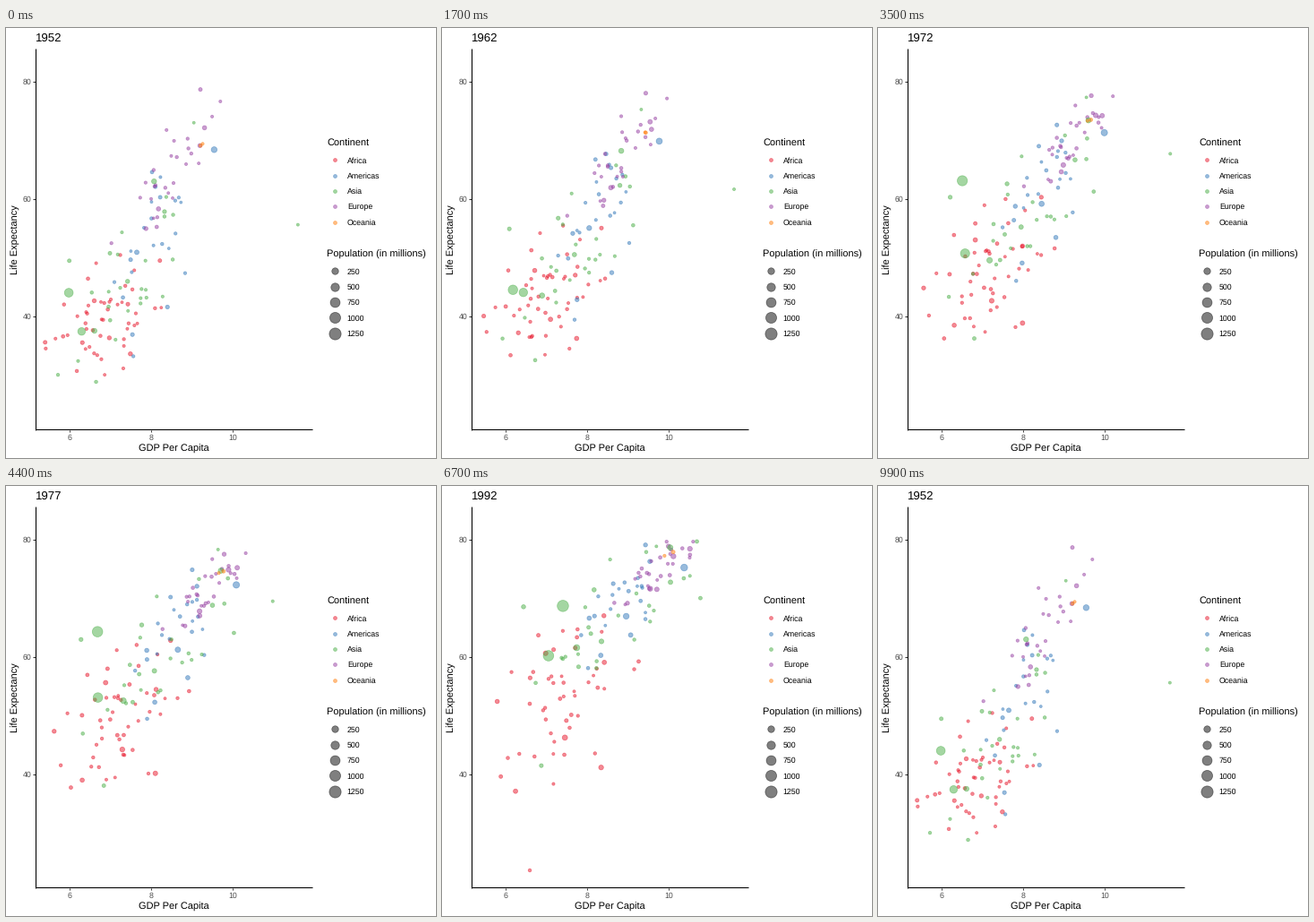
A matplotlib script for the animation above (10000 ms loop, 480 px wide and 480 px high).

```python
import numpy as np
import matplotlib.pyplot as plt
from matplotlib.animation import FuncAnimation

plt.rcParams["font.family"] = "Liberation Sans"
plt.rcParams["text.hinting"] = "none"

YEARS = np.arange(1952, 2008, 5)
KEYS = [1952, 1982, 2007]
ARRIVE = np.array([8, 17, 26, 35, 44, 51, 59, 67, 75, 83, 91, 99])
LEAVE = ARRIVE - 4
LEAVE[5] += 1  # one shorter move

COLORS = {"Africa": "#e8162b", "Americas": "#3278ba", "Asia": "#4aae47",
          "Europe": "#963fa2", "Oceania": "#ff7d08"}

# Count, then at the key years: mean and spread of log gdp and of life
CLOUDS = {
    "Africa": (50, [6.87, 7.33, 7.5], [0.66, 0.8, 0.9],
               [39.3, 51.8, 55], [4.8, 7, 9.2], 0.35),
    "Americas": (23, [8.05, 8.72, 9], [0.48, 0.5, 0.52],
                 [52.5, 66.3, 73.4], [8.8, 6, 3.8], 0.55),
    "Asia": (27, [7.5, 8.45, 8.95], [0.8, 1, 1.15],
             [47, 63.7, 71.5], [8.2, 7, 6], 0.6),
    "Europe": (30, [8.5, 9.6, 9.98], [0.58, 0.45, 0.56],
               [64.6, 73, 77.8], [6, 2.6, 2.8], 0.8),
}

# Continent, population in millions, stops of (year, gdp, life)
MOVERS = [
    ("Asia", (556, 1319), [(1952, 400, 44), (1962, 488, 44.5),
                           (1972, 677, 63.1), (1982, 962, 65.5),
                           (1992, 1656, 68.7), (2007, 4959, 73)]),
    ("Asia", (372, 1110), [(1952, 547, 37.4), (1972, 724, 50.7),
                           (1992, 1164, 60.2), (2007, 2452, 64.7)]),
    ("Asia", (82, 224), [(1952, 750, 37.5), (2007, 3541, 70.6)]),
    ("Asia", (86, 127), [(1952, 3217, 63), (1972, 14779, 73.4),
                         (2007, 31656, 82.6)]),
    ("Asia", (1, 3), [(1952, 108382, 55.6), (1972, 109348, 67.7),
                      (1982, 31354, 71.3), (2007, 47307, 77.6)]),
    ("Asia", (8, 32), [(1952, 779, 28.8), (1982, 978, 39.9),
                       (2007, 975, 43.8)]),
    ("Americas", (157, 301), [(1952, 13990, 68.4), (1972, 21806, 71.3),
                              (2007, 42952, 78.2)]),
    ("Americas", (57, 190), [(1952, 2109, 50.9), (1982, 7031, 63.3),
                             (2007, 9066, 72.4)]),
    ("Africa", (33, 135), [(1952, 1077, 36.3), (1982, 1577, 45.8),
                           (2007, 2014, 46.9)]),
    ("Africa", (3, 9), [(1952, 493, 40), (1987, 848, 44), (1992, 737, 23.6),
                        (1997, 590, 36.1), (2007, 863, 46.2)]),
    ("Oceania", (9, 20), [(1952, 10040, 69.1), (2007, 34435, 81.2)]),
    ("Oceania", (2, 4), [(1952, 10557, 69.4), (2007, 25185, 80.2)]),
]


def to_x(log_gdp):
    return 70.5 + 45.65 * (log_gdp - 6)


def to_y(life):
    return 321.7 - 6.545 * (life - 40)


def mark_radius(size):
    return 0.375 * (size * 2.845 + 0.945)


def pop_radius(pop):
    return mark_radius(1 + 5 * np.sqrt(np.clip(pop / 1318.7, 0, 1)))


def area(radius):
    return (2 * np.asarray(radius)) ** 2


def over_years(pair):
    first, last = pair
    return first + (last - first) * np.linspace(0, 1, len(YEARS))


def pack(log_gdp, life, pop):
    return np.stack([to_x(log_gdp), to_y(life), pop_radius(pop)], axis=-1)


def cloud_tracks(rng, count, x_mean, x_sd, y_mean, y_sd, link):
    """A drifting cloud, shape (years, dots, 3), in which ranks shift slowly."""
    z = rng.normal(size=(4, count)).clip(-2.1, 2.1)
    z = (z - z.mean(1, keepdims=True)) / z.std(1, keepdims=True)
    turn = np.linspace(0, 0.75, len(YEARS))[:, None]
    u = np.cos(turn) * z[0] + np.sin(turn) * z[1]
    v = np.cos(turn) * z[2] + np.sin(turn) * z[3]
    v = link * u + np.sqrt(1 - link ** 2) * v

    def spread(mean, sd, latent):
        mean, sd = (np.interp(YEARS, KEYS, k)[:, None] for k in (mean, sd))
        return mean + sd * latent

    pop = np.exp(rng.normal(1.5, 1.1, count)).clip(0.2, 45)
    growth = np.linspace(1, 2.4, len(YEARS))[:, None]
    life = spread(y_mean, y_sd, v).clip(30, 82)
    return pack(spread(x_mean, x_sd, u), life, pop * growth)


def mover_track(pops, stops):
    when, gdp, life = np.array(stops).T
    return pack(np.interp(YEARS, when, np.log(gdp)),
                np.interp(YEARS, when, life), over_years(pops))


rng = np.random.default_rng(12)
parts, colors = [], []
for name, spec in CLOUDS.items():
    parts.append(cloud_tracks(rng, *spec))
    colors += [COLORS[name]] * spec[0]
for name, pops, stops in MOVERS:
    parts.append(mover_track(pops, stops)[:, None])
    colors.append(COLORS[name])
tracks = np.concatenate(parts, axis=1)

# Canvas in pixel units: 72 dpi makes one point one pixel
fig = plt.figure(figsize=(480 / 72, 480 / 72), dpi=72, facecolor="white")
ax = fig.add_axes([0, 0, 1, 1])
ax.set_xlim(0, 480)
ax.set_ylim(480, 0)
ax.axis("off")


def label(x, y, text, size=8.8, color="black", **kw):
    return ax.text(x, y, text, size=size, color=color, va="baseline", **kw)


def line(xs, ys, color):
    ax.plot(xs, ys, color=color, lw=1.07, solid_capstyle="butt")


def dots(x, y, radius, color):
    return ax.scatter(x, y, s=area(radius), c=color, alpha=0.5,
                      linewidths=0.71, clip_on=False)


def legend(y, heading, names, radii, fills):
    label(358.3, y, heading, 11)
    for k, (name, radius, fill) in enumerate(zip(names, radii, fills)):
        row = y + 15.2 + 17.28 * k
        dots([367], [row], radius, [fill])
        label(380.8, row + 3.2, str(name))


for v in (6, 8, 10):
    line([to_x(v)] * 2, [448.5, 451.2], "#333333")
    label(to_x(v), 460.3, str(v), color="#4d4d4d", ha="center")
for v in (40, 60, 80):
    line([30.2, 33], [to_y(v)] * 2, "#333333")
    label(28.2, to_y(v) + 3.2, str(v), color="#4d4d4d", ha="right")
line([33.4, 33.4], [23, 448.9], "black")
line([33, 342], [448.4, 448.4], "black")
label(187.5, 473, "GDP Per Capita", 11, ha="center")
label(13.5, 236, "Life Expectancy", 11, ha="center", rotation=90,
      rotation_mode="anchor")

legend(132.2, "Continent", COLORS, [mark_radius(1.5)] * 5, COLORS.values())
sizes = np.array([250, 500, 750, 1000, 1250])
legend(256.2, "Population (in millions)", sizes, pop_radius(sizes),
       ["black"] * 5)

title = label(33, 15.2, "1952", 13.2)
cloud = dots(*tracks[0].T, colors)


def stage(i):
    """Index of the year being left and the progress to the next one."""
    for k, (a, b) in enumerate(zip(LEAVE, ARRIVE)):
        if i < b:
            return k, max(0, (i - a) / (b - a))
    return 0, 0


def draw(i):
    k, t = stage(i)
    nxt = (k + 1) % len(YEARS)
    now = tracks[k] * (1 - t) + tracks[nxt] * t
    cloud.set_offsets(now[:, :2])
    cloud.set_sizes(area(now[:, 2]))
    title.set_text(str(YEARS[nxt if t >= 0.5 else k]))
    return cloud, title


anim = FuncAnimation(fig, draw, frames=100, interval=100, repeat=True,
                     repeat_delay=0, blit=False)
plt.show()
```
